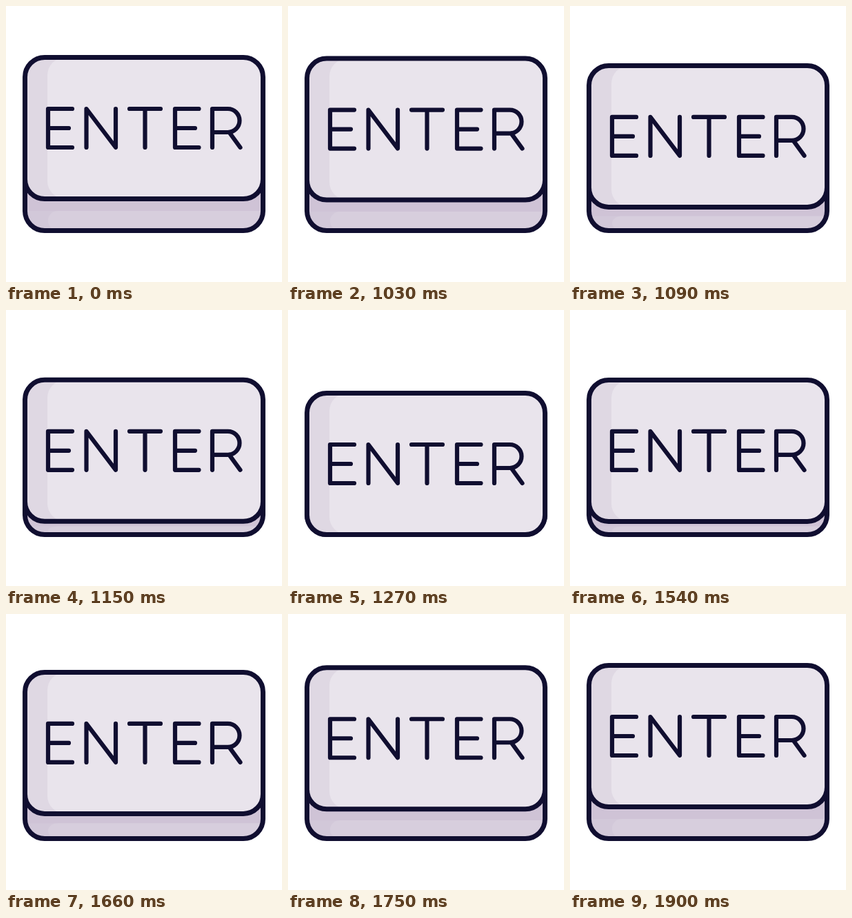
Animation of 400x400 px, one loop 1.93 s. Source, as an HTML page:

```html
<!DOCTYPE html>
<html lang="en">
<head>
<meta charset="utf-8">
<title>Enter key</title>
<style>
  html, body { margin: 0; width: 100%; height: 100%; overflow: hidden; background: #fff; }
  svg { display: block; width: 100%; height: 100%; }
  .line { fill: none; stroke: #100e30; stroke-width: 7; }
  .letters { fill: none; stroke: #100e30; stroke-width: 6.2; stroke-linecap: round; stroke-linejoin: round; }
</style>
</head>
<body>
<svg viewBox="0 0 400 400" role="img" aria-label="ENTER">
  <defs>
    <rect id="cap" x="27.5" y="74.5" width="345" height="205" rx="28.5"/>
    <rect id="base" x="27.5" y="180" width="345" height="145.5" rx="28.5"/>
    <clipPath id="inCap"><use href="#cap"/></clipPath>
    <clipPath id="inBase"><use href="#base"/></clipPath>
  </defs>

  <g clip-path="url(#inBase)">
    <rect x="24" y="180" width="352" height="150" fill="#cfc3d6"/>
    <g id="glow">
      <rect x="24" y="297" width="352" height="60" fill="#d2c8d9"/>
    </g>
    <g clip-path="url(#inBase)">
      <rect id="light" x="61" y="297" width="400" height="28.5" rx="14" fill="#d7cedd"/>
    </g>
  </g>
  <use href="#base" class="line"/>

  <g id="key">
    <g clip-path="url(#inCap)">
      <rect x="24" y="71" width="352" height="212" fill="#dfd8e3"/>
      <rect x="60" y="74.5" width="400" height="205" rx="26" fill="#e9e4ec"/>
    </g>
    <use href="#cap" class="line"/>
    <g class="letters">
      <path d="M96 149H61V205H96M61 177H91"/>
      <path d="M116.5 205V149L159 205V149"/>
      <path d="M179 149H224M201.5 149V205"/>
      <path d="M279.5 149H245V205H279.5M245 177H274"/>
      <path d="M299 205V149H321.5a17 17 0 0 1 0 34H299M323.5 183L339.5 205"/>
    </g>
  </g>
</svg>
<script>
  const LOOP = 1930, STEP = 30, TRAVEL = 46;
  const key = document.getElementById('key');
  const glow = document.getElementById('glow');
  const light = document.getElementById('light');

  // Cubic Bezier easing with control points (x1, 0) and (x2, 1).
  function ease(p, x1, x2) {
    if (p <= 0) return 0;
    if (p >= 1) return 1;
    let lo = 0, hi = 1, u = p;
    for (let i = 0; i < 24; i++) {
      u = (lo + hi) / 2;
      const v = 1 - u;
      const x = 3 * u * v * v * x1 + 3 * u * u * v * x2 + u * u * u;
      if (x < p) lo = u; else hi = u;
    }
    return u * u * (3 - 2 * u);
  }

  function pressAt(t) {
    const down = ease((t - 1000) / 270, 1 / 3, 2 / 3);
    const up = ease((t - 1300) / 600, 0.45, 0.39);
    return TRAVEL * (down - up);
  }

  // The pose is held for 30 ms at a time.
  function draw(now) {
    const t = now % LOOP;
    const y = pressAt(10 + Math.floor((t - 10) / STEP) * STEP);
    const shade = y * 0.62;
    key.setAttribute('transform', `translate(0 ${y.toFixed(2)})`);
    glow.setAttribute('transform', `translate(0 ${shade.toFixed(2)})`);
    light.setAttribute('y', 297 + shade);
    light.setAttribute('height', Math.max(0, 28.5 - shade));
  }

  const start = performance.now();
  function tick() {
    draw(performance.now() - start);
    requestAnimationFrame(tick);
  }
  tick();
</script>
</body>
</html>
```
